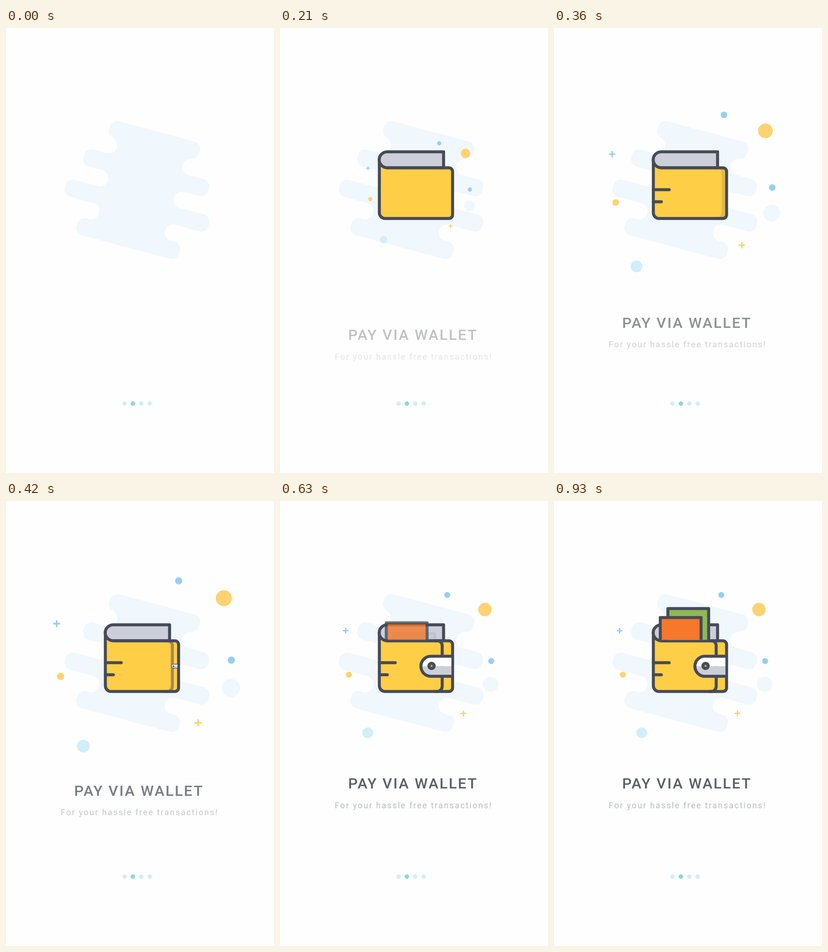
These frames come from a looping animation (580 by 966 pixels, 1820 ms). An HTML page:

```html
<!DOCTYPE html>
<html lang="en">
<head>
<meta charset="utf-8">
<title>Pay via wallet</title>
<style>
  html, body { margin: 0; width: 100%; height: 100%; overflow: hidden; background: #fefefe; }
  svg { display: block; width: 100%; height: 100%; }
  text { font-family: Roboto, sans-serif; }
  #title { font-size: 32px; font-weight: 500; letter-spacing: 2.56px; fill: #5b5e63; }
  #sub { font-size: 18px; letter-spacing: 2.2px; fill: #b9bbbd; }
  .line { stroke: #464b57; stroke-width: 6.5; stroke-linecap: round; stroke-linejoin: round; }
  .plus { stroke-width: 3; stroke-linecap: round; }
</style>
</head>
<body>
<svg viewBox="0 0 580 966">
  <defs>
    <clipPath id="pocket"><path d="M0 0H580V301.5H0z"/></clipPath>
  </defs>

  <path id="splash" fill="#f0f7fd" transform="rotate(15)"/>

  <g id="body">
    <path class="line" fill="#ffce47" d="M215 286V401a12.5 12.5 0 0 0 12.5 12.5H365.5a8 8 0 0 0 8-8V311.5a8 8 0 0 0-8-8H232"/>
  </g>
  <g id="back">
    <path class="line" fill="#cccfd9" d="M232 268.7H354V303.3H232a17.3 17.3 0 0 1 0-34.6z"/>
  </g>

  <g clip-path="url(#pocket)">
    <path id="green" class="line" fill="#8fb954" d="M246.5 320V233.5H334.7V320z"/>
    <path id="orange" class="line" fill="#f6782a" d="M230 320V253H318.3V320z"/>
  </g>

  <path id="flap" class="line" fill="none" d="M336 303.5H340.5a10.5 10.5 0 0 1 10.5 10.5V402.5a11 11 0 0 1-11 11H336"/>
  <path id="slot1" class="line"/>
  <path id="slot2" class="line"/>

  <g id="buckle">
    <path fill="#fff" d="M371 337H326.7a21.8 21.8 0 0 0-21.8 21.8H371z"/>
    <path fill="#cccfd9" d="M371 380.6H326.7a21.8 21.8 0 0 1-21.8-21.8H371z"/>
    <path class="line" fill="none" d="M371 337H326.7a21.8 21.8 0 0 0 0 43.6H371"/>
    <circle cx="328" cy="358" r="9" fill="#464b57"/>
    <circle cx="328" cy="358" r="2.4" fill="#a3b652"/>
  </g>

  <g id="confetti">
    <circle cx="362" cy="204" r="6.5" fill="#98cdf4"/>
    <circle cx="443.5" cy="235.5" r="14.5" fill="#ffd272"/>
    <circle cx="457" cy="347.5" r="6.5" fill="#98cdf4"/>
    <circle cx="456" cy="398" r="16.5" fill="#f0f7fd"/>
    <circle cx="149" cy="377" r="6.5" fill="#ffd272"/>
    <circle cx="190" cy="503" r="11.5" fill="#d0eefb"/>
    <path class="plus" stroke="#98cdf4" d="M137 281.5h10m-5-5v10"/>
    <path class="plus" stroke="#ffd272" d="M392 461h10m-5-5v10"/>
  </g>

  <g id="words">
    <text id="title" x="147.5" y="624">PAY VIA WALLET</text>
    <text id="sub" x="118.4" y="666.5">For your hassle free transactions!</text>
  </g>

  <g fill="#d1edfa">
    <circle cx="256.5" cy="815.3" r="4.8"/>
    <circle cx="274.6" cy="815.3" r="4.8" fill="#8bd3ea"/>
    <circle cx="292.8" cy="815.3" r="4.8"/>
    <circle cx="311" cy="815.3" r="4.8"/>
  </g>
</svg>
<script>
const LOOP = 1820, STEP = 30;
const el = id => document.getElementById(id);
const set = (id, name, value) => el(id).setAttribute(name, value);
const ramp = (t, from, to) => Math.min(1, Math.max(0, (t - from) / (to - from)));
const scaleAt = (x, y, sx, sy) => `translate(${x} ${y}) scale(${sx} ${sy}) translate(${-x} ${-y})`;

// Four stacked bars with rounded ends, joined by semicircular notches
function splashPath() {
  const right = [474.5, 514, 534.5, 488.5], left = [273, 234.5, 213, 259];
  let d = 'M340 132.3';
  right.forEach((u, k) => {
    d += `H${u - 16}a16 16 0 0 1 16 16v6a16 16 0 0 1-16 16`;
    if (k < 3) d += 'H464a17.95 17.95 0 0 0 0 35.9';
  });
  for (let k = 3; k >= 0; k--) {
    d += `H${left[k] + 16}a16 16 0 0 1-16-16v-6a16 16 0 0 1 16-16`;
    if (k) d += 'H281a17.95 17.95 0 0 0 0-35.9';
  }
  return d + 'z';
}

function card(id, p, rise) {
  set(id, 'opacity', p);
  set(id, 'transform', `translate(0 ${rise * (1 - p)})`);
}

function draw(t) {
  const open = ramp(t, 0, 210);
  set('body', 'transform', scaleAt(294.3, 0, open, 1));
  set('back', 'transform', scaleAt(284.5, 0, open, 1));

  const burst = ramp(t, 0, 300) + 0.2 * (ramp(t, 300, 420) - ramp(t, 420, 540));
  set('confetti', 'transform', scaleAt(303.5, 358, burst, burst));

  const slot = ramp(t, 210, 330);
  set('slot1', 'd', slot ? `M215 351h${34.3 * slot}` : '');
  set('slot2', 'd', slot ? `M215 377.3h${17.3 * slot}` : '');

  const fold = ramp(t, 330, 510);
  set('flap', 'opacity', fold);
  set('flap', 'transform', `translate(${18 * (1 - fold)} 0)`);
  const snap = ramp(t, 390, 540);
  set('buckle', 'transform', scaleAt(371, 358.8, snap, snap));

  card('orange', ramp(t, 510, 660), 57);
  card('green', ramp(t, 600, 930), 60);

  const text = ramp(t, 30, 510);
  set('words', 'opacity', text);
  set('words', 'transform', `translate(0 ${85 * (1 - text)})`);
}

set('splash', 'd', splashPath());
const start = performance.now();
function tick() {
  const t = (performance.now() - start) % LOOP;
  draw(Math.floor(t / STEP) * STEP);
  requestAnimationFrame(tick);
}
tick();
</script>
</body>
</html>
```
